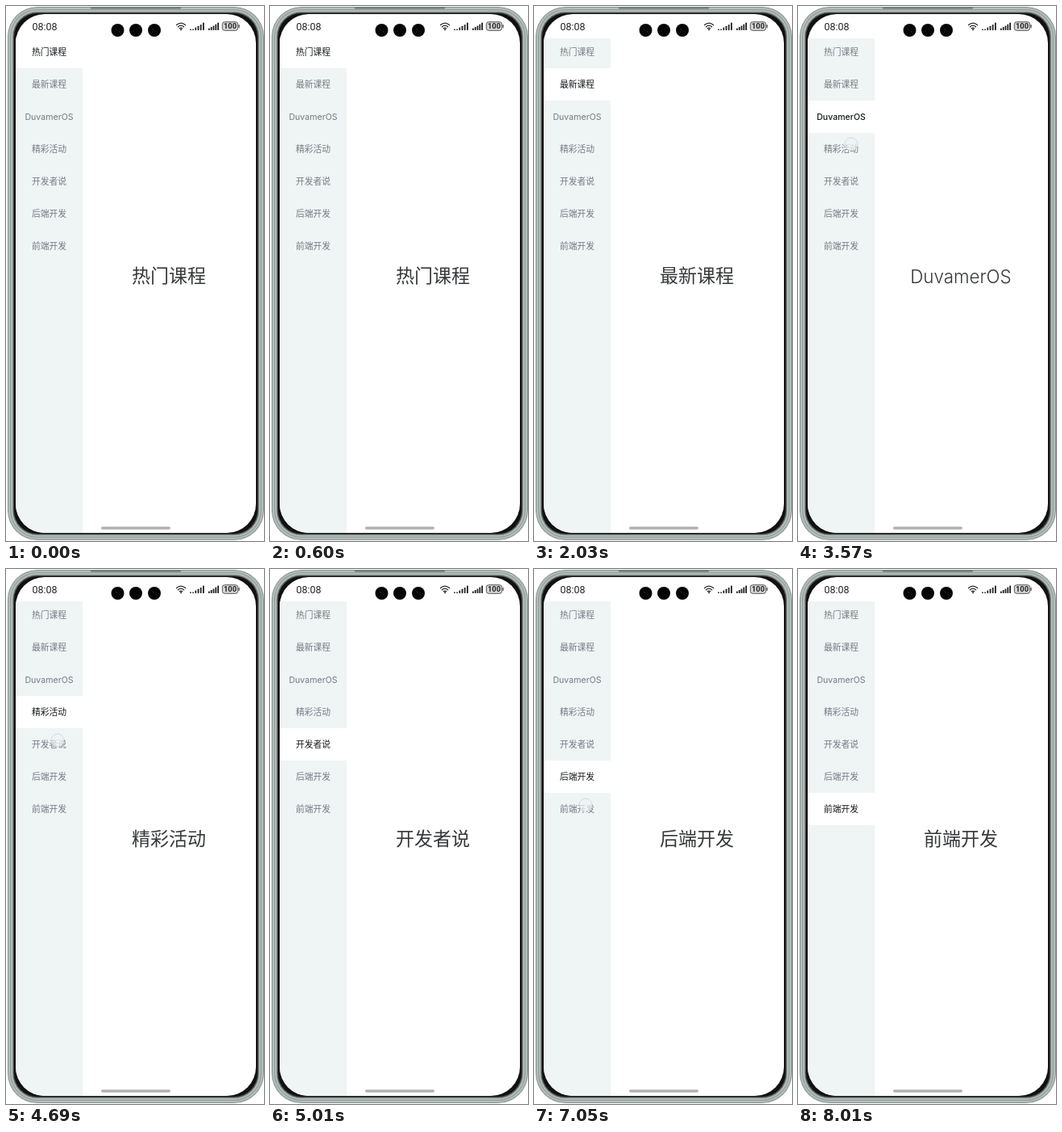
These frames come from a looping animation (320 by 662 pixels, 8260 ms). An HTML page:

```html
<!DOCTYPE html>
<html lang="zh-CN">
<head>
<meta charset="utf-8">
<title>Course tabs</title>
<style>
html, body { margin: 0; width: 100%; height: 100%; overflow: hidden; background: #fff; }
svg { display: block; width: 320px; height: 662px; }
text { font-family: "Noto Sans CJK SC", "Noto Sans CJK", sans-serif; text-anchor: middle; }
.latin { font-family: Inter, sans-serif; }
.status { font-family: Roboto, sans-serif; }
</style>
</head>
<body>
<svg viewBox="0 0 320 662">
  <defs>
    <clipPath id="screen"><rect x="12" y="10" width="298" height="642" rx="36"/></clipPath>
  </defs>

  <g id="case"></g>
  <rect x="105" y="1.500" width="112" height="2" rx="1" fill="#6a7471"/>

  <g clip-path="url(#screen)">
    <rect x="12" y="10" width="298" height="642" fill="#fff"/>
    <rect x="12" y="40" width="83" height="612" fill="#eff4f5"/>
    <rect id="mark" x="12" width="83" height="40" fill="#fff"/>
    <g id="tabs"></g>
    <text id="page" x="202" fill="#36383a" font-weight="350"></text>
    <circle id="touch" r="8" fill="#f1f2f5" fill-opacity=".7" stroke="#cbcdd4" stroke-opacity=".7"/>
    <rect x="118" y="644.300" width="86" height="3.400" rx="1.700" fill="#b0b2b3"/>
  </g>

  <g id="status" fill="#222">
    <text class="status" x="48" y="30" font-size="12.500">08:08</text>
    <g fill="#050506">
      <circle cx="138.500" cy="30" r="8"/>
      <circle cx="161" cy="30" r="8"/>
      <circle cx="184" cy="30" r="8"/>
    </g>
    <g fill="none" stroke="#22303e" stroke-linecap="round">
      <path d="M136 28l1.500 1.500M140.500 31.500l1 1M182 28l1.500 1.500M186 31.500l1 1"/>
    </g>
    <path d="M211.500 23.500Q217 18.800 222.500 23.500M213.400 25.800Q217 22.600 220.600 25.800M215.200 27.800Q217 26.300 218.800 27.800"
      fill="none" stroke="#222" stroke-width="1.200" stroke-linecap="round"/>
    <circle cx="217" cy="29.300" r="1"/>
    <g id="bars"></g>
    <rect x="268.300" y="19.700" width="19.400" height="10.600" rx="3" fill="#d4d5d5" stroke="#555"/>
    <rect x="288.500" y="23" width="1.200" height="4" rx=".6" fill="#444"/>
    <text class="status" x="278" y="28.300" font-size="9.300" font-weight="600">100</text>
  </g>
</svg>
<script>
const NS = "http://www.w3.org/2000/svg";
const LOOP = 8260;
const names = ["热门课程", "最新课程", "DuvamerOS", "精彩活动", "开发者说", "后端开发", "前端开发"];
// finger down, tab switch, finger up (ms), finger position
const taps = [
  [1160, 1240, 1240, 65, 92],
  [2280, 2360, 2360, 65, 132],
  [3570, 3650, 3650, 66, 171],
  [4690, 4770, 4850, 64, 212],
  [5890, 5970, 6050, 64, 252],
  [7050, 7170, 7170, 64, 292]
];
// inset and colour of each ring of the phone case, outside in
const rings = [
  [0, "#87928f"], [1, "#b3bebb"], [3, "#98a3a0"], [4.5, "#b9c2bf"],
  [6, "#7d8684"], [7, "#484d4c"], [8, "#111"]
];

const get = id => document.getElementById(id);
const set = (el, attrs) => {
  for (const k in attrs) el.setAttribute(k, attrs[k]);
  return el;
};
const add = (parent, tag, attrs) =>
  parent.appendChild(set(document.createElementNS(NS, tag), attrs));
const isLatin = s => /^[A-Z]/.test(s);

rings.forEach(([d, fill]) => add(get("case"), "rect", {
  x: 2 + d, y: 1 + d, width: 318 - 2 * d, height: 660 - 2 * d, rx: 37 - d, fill
}));

function label(el, s, y, cjkSize, latinSize) {
  const latin = isLatin(s);
  const size = latin ? latinSize : cjkSize;
  el.textContent = s;
  set(el, { class: latin ? "latin" : "", "font-size": size, y: y + size * (latin ? .4 : .36) });
}

const tabs = names.map((s, i) => {
  const el = add(get("tabs"), "text", { x: 53.5 });
  label(el, s, 57 + i * 40, 10.8, 10.6);
  return el;
});

function signal(x, heights, step) {
  heights.forEach((h, i) =>
    add(get("bars"), "rect", { x: x + i * step, y: 30 - h, width: 1.8, height: h, rx: .4 }));
}
signal(228, [1.6, 1.6, 3.5, 5.2, 7, 9.5], 3.2);
signal(251, [2.5, 4, 5.6, 7.4, 9.5], 2.8);

let shown = -1;
function select(n) {
  if (n === shown) return;
  shown = n;
  set(get("mark"), { y: 37 + n * 40 });
  label(get("page"), names[n], 333.7, 23, 22.4);
  tabs.forEach((el, i) => set(el, {
    fill: i === n ? "#16191c" : "#747b82",
    "font-weight": i === n ? 500 : 400
  }));
}

function draw(t) {
  select(taps.filter(tap => t >= tap[1]).length);
  const tap = taps.find(([down, , up]) => t >= down && t < up);
  set(get("touch"), tap
    ? { cx: tap[3], cy: tap[4], visibility: "visible" }
    : { visibility: "hidden" });
}

function tick() {
  draw(performance.now() % LOOP);
  requestAnimationFrame(tick);
}
tick();
</script>
</body>
</html>
```
